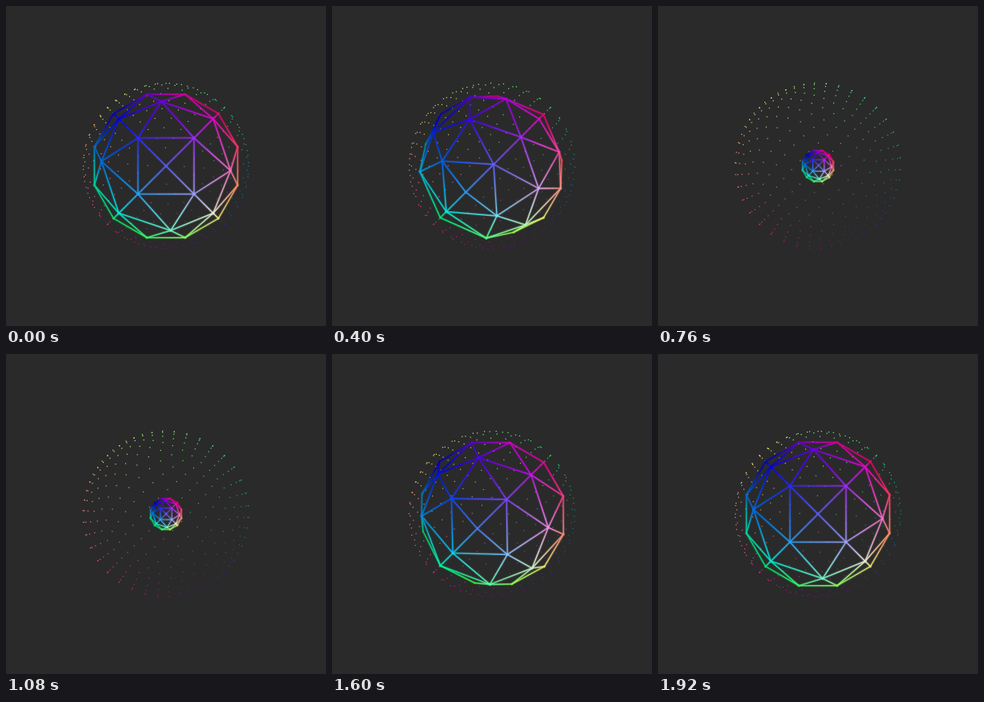
These frames come from a looping animation (400 px wide and 400 px high, 1.96 s). An HTML page with a canvas:

```html
<!DOCTYPE html>
<html lang="en">
<head>
<meta charset="utf-8">
<title>Geodesic pulse</title>
<style>
html, body { margin: 0; width: 100%; height: 100%; overflow: hidden; background: #2a2a2a; }
canvas { display: block; width: 400px; height: 400px; }
</style>
</head>
<body>
<canvas id="stage" width="400" height="400"></canvas>
<script>
const ctx = document.getElementById('stage').getContext('2d');
const LOOP = 1960, HALF = LOOP / 2, STEP = 40;
const DEPTH = 1240, BIG = 92.7, SMALL = 20, SHELL = 103.3;

const clamp = (v, lo = 0, hi = 1) => Math.min(hi, Math.max(lo, v));
const cubic = p => p < 0.5 ? 4 * p ** 3 : 1 - 4 * (1 - p) ** 3;

function slerp(a, b, t) {
  const angle = Math.acos(clamp(a[0] * b[0] + a[1] * b[1] + a[2] * b[2], -1));
  if (angle < 1e-6) return a;
  const ka = Math.sin((1 - t) * angle) / Math.sin(angle);
  const kb = Math.sin(t * angle) / Math.sin(angle);
  return a.map((v, i) => v * ka + b[i] * kb);
}

// Octahedron subdivided row by row from its two poles on the first axis.
function geodesic(n) {
  const points = [], faces = [], edges = new Map(), index = new Map();
  const add = p => {
    const key = p.map(v => Math.round(v * 1e4) + 0).join();
    if (!index.has(key)) index.set(key, points.push(p) - 1);
    return index.get(key);
  };
  const addFace = (...f) => {
    const id = faces.push(f) - 1;
    f.forEach((a, i) => {
      const b = f[(i + 1) % 3];
      const key = Math.min(a, b) + '-' + Math.max(a, b);
      if (!edges.has(key)) edges.set(key, { a, b, faces: [] });
      edges.get(key).faces.push(id);
    });
  };
  for (const su of [-1, 1]) for (const sv of [-1, 1]) for (const sz of [-1, 1]) {
    const apex = [su, 0, 0], left = [0, sv, 0], right = [0, 0, sz];
    const rows = [];
    for (let i = 0; i <= n; i++) {
      const l = slerp(apex, left, i / n), r = slerp(apex, right, i / n);
      rows.push(Array.from({ length: i + 1 }, (_, j) => add(slerp(l, r, i ? j / i : 0))));
    }
    for (let i = 0; i < n; i++) {
      for (let j = 0; j <= i; j++) {
        addFace(rows[i][j], rows[i + 1][j], rows[i + 1][j + 1]);
        if (j < i) addFace(rows[i][j], rows[i + 1][j + 1], rows[i][j + 1]);
      }
    }
  }
  return { points, faces, edges: [...edges.values()] };
}

const ball = geodesic(3);
const shell = geodesic(12);

// Turns a point about the falling diagonal and projects it.
function project([u, v, z], angle, radius) {
  const c = Math.cos(angle), s = Math.sin(angle);
  const w = v * c + z * s, nz = z * c - v * s;
  const nx = (u - w) * Math.SQRT1_2, ny = (u + w) * Math.SQRT1_2;
  const k = radius * DEPTH / (DEPTH - nz * radius);
  return { x: 200 + nx * k, y: 200 + ny * k, n: [nx, ny, nz] };
}

const rgb = c => `rgb(${c.map(v => Math.round(255 * clamp(v))).join()})`;

function lineColor(n) {
  const c = n.map(v => clamp(0.37 + 0.63 * v));
  const gain = Math.max(...c, 0.2) ** 0.7;
  return rgb(c.map(v => v / gain));
}

function dotColor([x, y, z]) {
  return rgb([0.53 - 0.5 * x, 0.53 - 0.5 * y, 0.52 - 0.08 * z]);
}

function drawShell(angle) {
  for (const point of shell.points) {
    const p = project(point, angle, SHELL);
    if (p.n[2] < -0.01) continue;
    ctx.fillStyle = dotColor(p.n);
    ctx.fillRect(p.x - 0.6, p.y - 0.6, 1.2, 1.2);
  }
}

function drawBall(angle, radius) {
  const pts = ball.points.map(p => project(p, angle, radius));
  const front = ball.faces.map(([a, b, c]) => {
    const p = pts[a], q = pts[b], r = pts[c];
    const area = (q.x - p.x) * (r.y - p.y) - (q.y - p.y) * (r.x - p.x);
    // Winding differs between octants, so orient it by the outward side.
    const [A, B, C] = [a, b, c].map(i => ball.points[i]);
    const det = A[0] * (B[1] * C[2] - B[2] * C[1])
      - A[1] * (B[0] * C[2] - B[2] * C[0])
      + A[2] * (B[0] * C[1] - B[1] * C[0]);
    return area * det > 0;
  });
  const lines = ball.edges.filter(e => e.faces.some(f => front[f])).map(e => {
    const p = pts[e.a], q = pts[e.b];
    const paint = ctx.createLinearGradient(p.x, p.y, q.x, q.y);
    for (let i = 0; i <= 4; i++) {
      const t = i / 4;
      paint.addColorStop(t, lineColor(p.n.map((v, k) => v + (q.n[k] - v) * t)));
    }
    return { p, q, paint };
  });
  const core = 0.85 + 0.45 * radius / BIG;
  for (const [width, alpha] of [[core + 2, 0.25], [core, 0.95]]) {
    ctx.lineWidth = width;
    ctx.globalAlpha = alpha;
    for (const { p, q, paint } of lines) {
      ctx.strokeStyle = paint;
      ctx.beginPath();
      ctx.moveTo(p.x, p.y);
      ctx.lineTo(q.x, q.y);
      ctx.stroke();
    }
  }
  ctx.globalAlpha = 1;
}

function draw(ms) {
  const t = Math.floor((ms % LOOP) / STEP) * STEP + STEP / 2;
  const there = HALF - Math.abs(HALF - t);
  const turn = cubic(there / HALF) * Math.PI / 2;
  const shrink = cubic(clamp((there - 348) / 422));
  ctx.fillStyle = '#2a2a2a';
  ctx.fillRect(0, 0, 400, 400);
  drawShell(-turn / 2);
  drawBall(turn, BIG + (SMALL - BIG) * shrink);
}

ctx.lineCap = 'round';
const start = performance.now();
function tick() {
  draw(performance.now() - start);
  requestAnimationFrame(tick);
}
tick();
</script>
</body>
</html>
```
